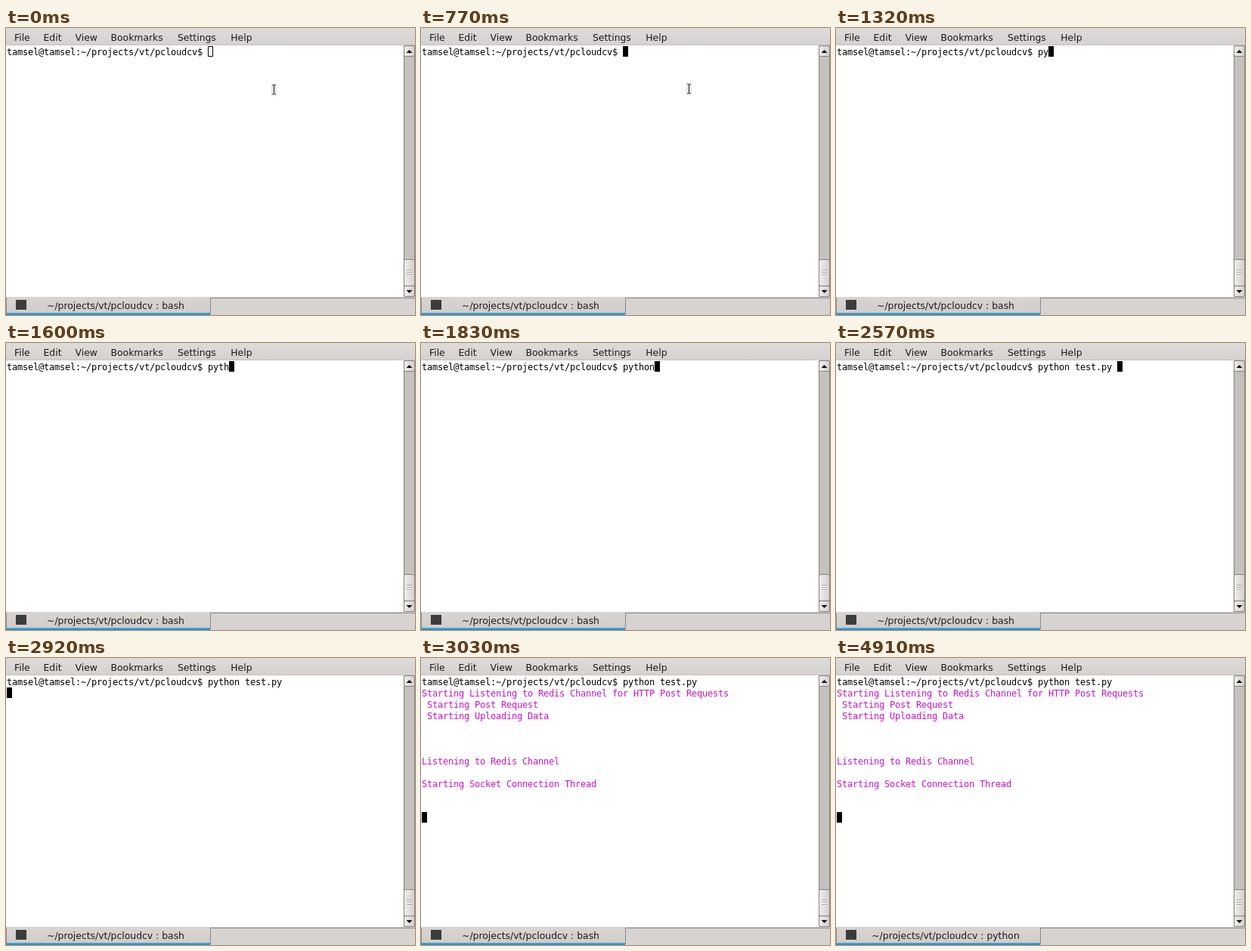
Recreate the animation shown at these times as an HTML page with a canvas. Size 541 by 380 pixels, loop 8 s.

```html
<!DOCTYPE html>
<html lang="en">
<head>
<meta charset="utf-8">
<title>Terminal session</title>
<style>
  html, body { margin: 0; width: 541px; height: 380px; overflow: hidden; }
  canvas { display: block; }
</style>
</head>
<body>
<canvas id="stage" width="541" height="380"></canvas>
<script>
const ctx = document.getElementById('stage').getContext('2d');
const LOOP = 8000, CELL = 7, ROW = 15, LEFT = 1, TOP = 24;
const PROMPT = 'tamsel@tamsel:~/projects/vt/pcloudcv$ ';
const COMMAND = 'python test.py ';
// [time in ms, characters of the command shown]; the last step is a tab completion
const TYPING = [[1020, 1], [1320, 2], [1490, 3], [1600, 4], [1720, 5], [1830, 6],
  [1960, 7], [2070, 8], [2180, 9], [2350, 10], [2570, 15]];
const OUTPUT = [
  [1, 'Starting Listening to Redis Channel for HTTP Post Requests'],
  [2, ' Starting Post Request'],
  [3, ' Starting Uploading Data'],
  [7, 'Listening to Redis Channel'],
  [9, 'Starting Socket Connection Thread']
];
const MENU = [['File', 11], ['Edit', 49.5], ['View', 91.5], ['Bookmarks', 138.5],
  ['Settings', 227], ['Help', 297.3]];

function rect(x, y, w, h, color) {
  ctx.fillStyle = color;
  ctx.fillRect(x, y, w, h);
}

function shade(x, y, w, h, from, to, sideways) {
  const g = sideways ? ctx.createLinearGradient(x, 0, x + w, 0)
                     : ctx.createLinearGradient(0, y, 0, y + h);
  g.addColorStop(0, from);
  g.addColorStop(1, to);
  rect(x, y, w, h, g);
}

function outline(x, y, w, h, color, radius = 0) {
  ctx.strokeStyle = color;
  ctx.lineWidth = 1;
  ctx.beginPath();
  ctx.roundRect(x + .5, y + .5, w - 1, h - 1, radius);
  ctx.stroke();
}

function label(text, x, y, align = 'left') {
  ctx.font = '12.4px "DejaVu Sans", sans-serif';
  ctx.textAlign = align;
  ctx.fillStyle = '#1c1a19';
  ctx.fillText(text, x, y);
}

// Terminal text sits on a fixed character grid
function print(text, row, color) {
  ctx.font = '12px "DejaVu Sans Mono", monospace';
  ctx.textAlign = 'left';
  ctx.fillStyle = color;
  [...text].forEach((c, i) => ctx.fillText(c, LEFT + i * CELL, TOP + row * ROW + 12));
}

function cursor(col, row, hollow) {
  const x = LEFT + col * CELL, y = TOP + row * ROW;
  if (hollow) outline(x, y, 7, 14, '#000');
  else rect(x, y, 7, 14, '#000');
}

function arrow(y, dir) {
  ctx.fillStyle = '#111';
  ctx.beginPath();
  ctx.moveTo(529.5, y - 2 * dir);
  ctx.lineTo(537.5, y - 2 * dir);
  ctx.lineTo(533.5, y + 2 * dir);
  ctx.fill();
}

function scrollbar() {
  rect(526, 23, 15, 334, '#c5c1bc');
  outline(526, 23, 15, 333, '#85817d', 2);
  for (const [y, h] of [[23, 15], [306, 36], [341, 15]]) {
    shade(527, y + 1, 13, h - 2, '#eeecea', '#d5d1cd', true);
    outline(526, y, 15, h, '#85817d', 2);
  }
  arrow(31, -1);
  arrow(349, 1);
  for (const y of [320, 323, 326]) {
    rect(530, y, 7, 1, '#aaa6a2');
    rect(530, y + 1, 7, 1, '#f8f7f6');
  }
}

function tabBar(name) {
  rect(0, 356, 541, 24, '#d6d3d0');
  rect(270, 357, 271, 1, '#8e8a87');
  shade(0, 357, 270, 20, '#d7d4d1', '#d0cdca');
  rect(0, 357, 1, 23, '#8e8a87');
  rect(270, 357, 1, 22, '#8e8a87');
  shade(1, 377, 269, 3, '#56aee0', '#2384bd');
  rect(13, 360, 14, 13, '#3c3c3c');
  label('~/projects/vt/pcloudcv : ' + name, 145, 372, 'center');
}

function pointer(y) {
  rect(351, y, 7, 16, '#e3e3e3');
  rect(352, y + 1, 5, 1, '#555');
  rect(352, y + 13, 5, 1, '#555');
  rect(354, y + 2, 1, 11, '#222');
}

function draw(t) {
  rect(0, 0, 541, 380, '#fff');
  shade(0, 0, 541, 23, '#dedcda', '#d4d1ce');
  rect(0, 22, 541, 1, '#c6c2be');
  MENU.forEach(([text, x]) => label(text, x, 17));
  scrollbar();
  tabBar(t < 4910 ? 'bash' : 'python');

  const typed = TYPING.reduce((n, [at, count]) => t >= at ? count : n, 0);
  print(PROMPT + COMMAND.slice(0, typed), 0, '#000');
  if (t >= 3030) {
    OUTPUT.forEach(([row, text]) => print(text, row, '#c814c8'));
    cursor(0, 12);
  } else if (t >= 2920) {
    cursor(0, 1);
  } else {
    cursor(PROMPT.length + typed, 0, t < 770);
  }
  if (t < 1060) pointer(t < 500 ? 74 : 73);
}

const start = performance.now();
function frame() {
  draw((performance.now() - start) % LOOP);
  requestAnimationFrame(frame);
}
frame();
</script>
</body>
</html>
```
